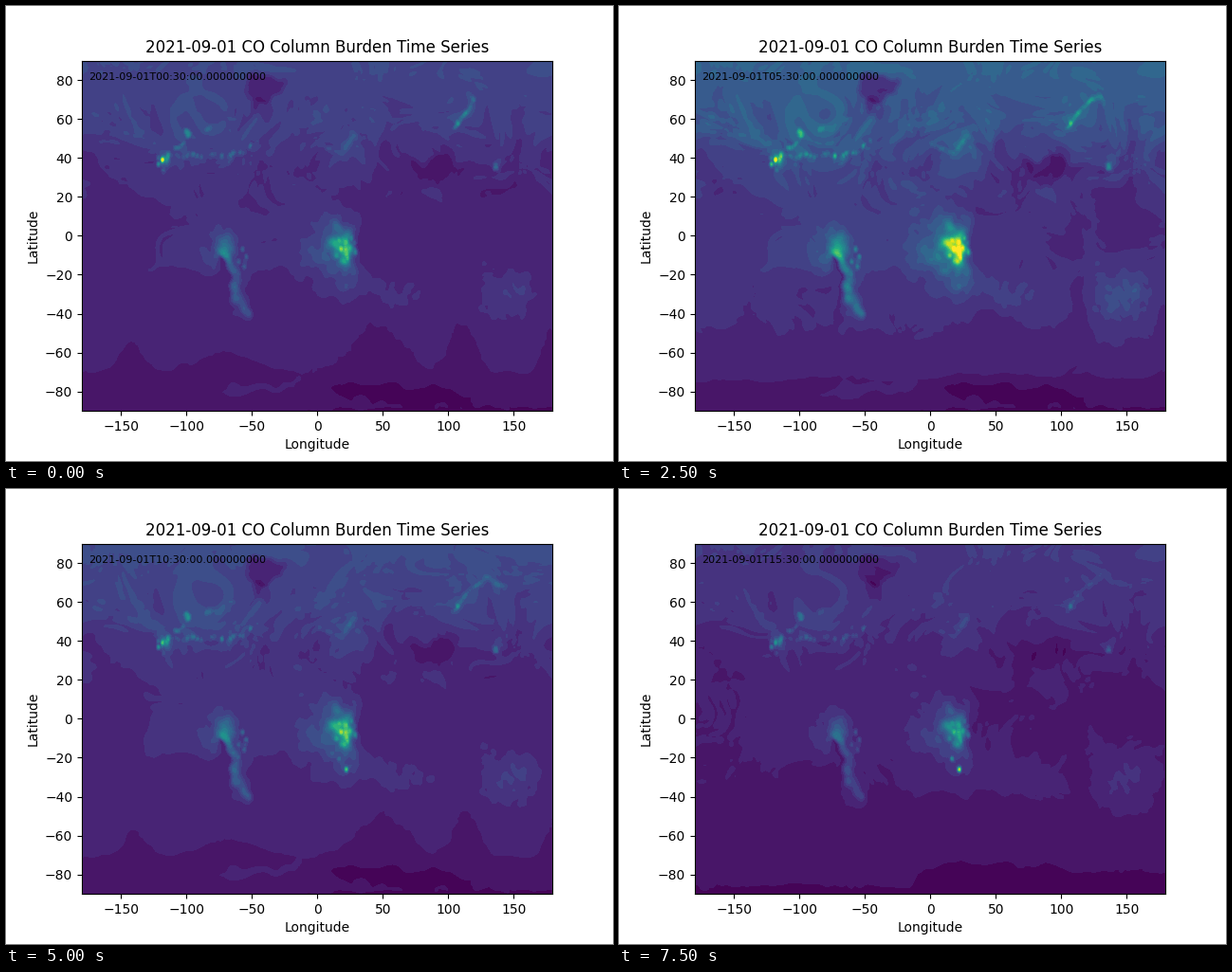
Write a matplotlib script that moves like this. It is 640 by 480 pixels and loops after 8000 ms.

```python
import numpy as np
import matplotlib.pyplot as plt
from matplotlib.animation import FuncAnimation

FRAMES = 16
LAYERS = 22

lon = np.linspace(-180, 179.375, 481)
lat = np.linspace(-90, 90, 241)
X, Y = np.meshgrid(lon, lat)


def waves(x, y, n, lo, hi, seed):
    """Unit-variance noise, periodic in longitude."""
    rng = np.random.default_rng(seed)
    out = np.zeros_like(x)
    for _ in range(n):
        k = rng.uniform(lo, hi)
        a = rng.uniform(-np.pi, np.pi)
        kx, ky = np.round(k * np.cos(a) * 0.8), k * np.sin(a) * 1.2
        phase = np.radians(kx * x + ky * y) + rng.uniform(0, 2 * np.pi)
        out += np.sin(phase) * (lo / k) ** 0.7
    return out / out.std()


# Bent coordinates give every shape an irregular outline.
bend = waves(X, Y, 24, 9, 42, 1)
XB = X + 1.7 * bend
YB = Y + 1.3 * waves(X, Y, 24, 9, 42, 2)
swirl_x = 11 * waves(X, Y, 14, 3, 11, 3)
swirl_y = 6 * waves(X, Y, 14, 3, 11, 4)
grain = waves(X, Y, 30, 25, 80, 7)


def smooth(v):
    v = np.clip(v, 0, 1)
    return v * v * (3 - 2 * v)


def ramp(v):
    return np.clip(v, 0, 1)


def blob(x, y, sx, sy, amp, power=1, tilt=0.0):
    dx, dy = XB - x, YB - y - tilt * (XB - x)
    return amp * np.exp(-(((dx / sx) ** 2 + (dy / sy) ** 2) / 2) ** power)


def plume(x, y, size, amp, wind=(0, 0)):
    """Hot core inside ever wider, weaker halos blown downwind."""
    return sum(blob(x + wind[0] * j, y + wind[1] * j,
                    size * 1.65 ** j, size * 1.5 ** j, amp * 0.48 ** j)
               for j in range(4))


def spot(x, y, amp, size=0.8):
    return amp * np.exp(-((X - x) ** 2 + (Y - y) ** 2) / (2 * size ** 2))


def spots(x, y, spread, n, amp, seed):
    rng = np.random.default_rng(seed)
    return sum(spot(rng.normal(x, spread), rng.normal(y, spread * 0.7),
                    amp * rng.uniform(0.4, 1)) for _ in range(n))


def streak(points, width, amp, n=26):
    """Ridge along a polyline."""
    px, py = np.transpose(points)
    step = np.linspace(0, len(px) - 1, n)
    d2 = np.full_like(X, 1e9)
    for x, y in zip(np.interp(step, range(len(px)), px),
                    np.interp(step, range(len(px)), py)):
        d2 = np.minimum(d2, (XB - x) ** 2 + (YB - y) ** 2)
    return amp * np.exp(-d2 / (2 * width ** 2))


def background():
    """Clean south, mild tropics, loaded north."""
    start = 35 - 5 * np.cos(np.radians(X + 85))
    v = (2.42 + 0.5 * ramp((YB - 8) / (start - 8)) ** 2
         + 1.2 * ramp((YB - start) / 20)
         + 0.75 * ramp((YB - 60) / 24))
    west = smooth((78 - abs(XB + 70)) / 22) * smooth((29 - abs(YB - 6)) / 9)
    return v + 0.5 * west


def southern_drop(k):
    edge = -70 + 0.6 * bend
    for centre, width, rise in [(-142, 13, 17), (-70, 26, 12), (46, 26, 28),
                                (111, 13, 32), (178, 9, 24)]:
        edge = edge + rise * np.exp(-((X - centre - 4 * k) / width) ** 2)
    return (0.45 * ramp(YB / edge) ** 3
            + 0.45 * ramp((edge - Y) / (edge + 76))
            + 0.03 * np.clip(-76 - Y, 0, None))


def smoke():
    coast = smooth((37 - XB) / 9)
    v = plume(21, -5, 5, 7, (-5, 0.5)) * coast + blob(18, -15, 5, 4, 2)
    v += blob(24, -22, 7, 7, 1)
    v += plume(-70, -8, 3.6, 3.8, (-2, 1.5))
    v += streak([(-66, -12), (-63, -24), (-62, -34), (-54, -39)], 2.6, 2.9)
    v += blob(-61, -30, 6, 11, 1)
    v += plume(28, 48, 3.5, 1.2, (-3, 0)) + plume(-117, 40, 2.5, 2, (3, 1))
    v += plume(110, 61, 4, 0.6) + plume(138, 36, 2, 1)
    v += blob(-72, 45, 24, 8, 0.5) + blob(52, -29, 26, 6, 0.9, tilt=-0.1)
    v += blob(128, -14, 5, 9, 0.5, tilt=-0.6)

    thin = streak([(-122, 40), (-114, 41), (-102, 48), (-100, 55)], 0.9, 2.6)
    thin += streak([(-114, 42), (-90, 41), (-68, 40), (-46, 46)], 0.9, 2.2)
    thin += streak([(-82, 54), (-62, 59)], 1.1, 1.0)
    thin += streak([(0, 48), (20, 44), (31, 50)], 1.1, 1.2)
    v += thin * np.clip(0.8 + 0.5 * grain, 0.1, 1.7)

    v *= 1 + 0.11 * grain + 0.08 * bend
    v += spots(22, -6, 4.5, 18, 4, 8) + spots(-57, -14, 4, 6, 3.5, 9)
    v += spots(-117, 39, 4, 9, 4, 10) + spots(136, 35, 1.5, 3, 2.5, 11)
    return v + spot(107, 58, 4.5) + blob(22, -5, 2.4, 2.4, 2)


def clean_air():
    low = blob(-40, 76, 12, 5, 2.3, 3) + blob(-43, 67, 6, 5, 1.4, 3)
    low += blob(89, 34, 14, 4.5, 1.2, 3, -0.08)
    low += blob(140, 2, 42, 20, 0.25)
    low += blob(58, -80, 42, 4, 0.45, 2, -0.05)
    low += 0.2 * smooth((X + 20) / 25) * smooth((-70 - Y) / 6)
    return low - blob(-48, -79, 26, 1.8, 0.7, 2, 0.06)


fixed = background() + smoke() - clean_air()
andes = streak([(-73, -14), (-69, -22), (-71, -48)], 1.4, 1.0)
north = smooth((Y - 6) / 32) * (1 - 0.75 * smooth((Y - 64) / 14))


def noise(i):
    x, y = X + swirl_x - 0.45 * i * north, Y + swirl_y
    big = waves(x, y, 22, 5, 16, 5)
    fine = waves(x, y, 32, 18, 60, 6)
    calm = 0.02 + 0.04 * smooth((Y + 55) / 30)
    return np.clip((calm + 0.24 * north) * big
                   + (0.7 * calm + 0.18 * north) * fine, -0.6, 0.9)


def field(i):
    k = i / (FRAMES - 1)
    v = fixed - southern_drop(k) + noise(i)
    v += blob(146 + 3 * k, -31, 15, 9, 1.5, 1, 0.1) * (1 + 0.15 * grain)

    # Smoke arc drifting east.
    arc = [(107, 58), (115 + 2 * k, 63.5 + 5 * k),
           (116 + 17 * k, 70 + 3 * k), (117 + 36 * k, 71.5 - 5 * k)]
    v += streak(arc, 1.1, 3.2 - 2 * k) * np.clip(1 + 0.3 * grain, 0.3, 1.6)

    v += (1.9 - v) * andes
    v += spot(-118.5, 39, 6 + 11 * np.exp(-i / 4))
    v += spot(-73, 41, 3 + 4 * np.exp(-((i - 7) / 4) ** 2))
    v += spot(22, -26, 1 + 20 * smooth((i - 6) / 8))
    v += spot(16.5, -20.5, 9 * smooth((i - 8) / 5))
    return v


def levels(i):
    """First boundary and spacing of the colour layers."""
    k = i / (FRAMES - 1)
    first = 0.95 + 0.28 * k ** 12
    step = 1 + 0.22 * k ** 6 - 0.42 * np.exp(-((i - 6.3) / 2.9) ** 2)
    return first, step


fig, ax = plt.subplots(figsize=(6.4, 4.8), dpi=100)
ax.set_title("2021-09-01 CO Column Burden Time Series")
ax.set_xlabel("Longitude")
ax.set_ylabel("Latitude")
stamp = ax.text(-175, 80, "", fontsize=8, zorder=5)
shown = []


def update(i):
    while shown:
        shown.pop().remove()
    first, step = levels(i)
    vmin = first - 0.72 * step
    shown.append(ax.contourf(lon, lat, field(i),
                             first + step * np.arange(-1, LAYERS),
                             cmap="viridis", vmin=vmin,
                             vmax=vmin + LAYERS * step, extend="both"))
    ax.set_xlim(lon[0], lon[-1])
    ax.set_ylim(-90, 90)
    stamp.set_text(f"2021-09-01T{i:02d}:30:00.000000000")
    return [stamp]


anim = FuncAnimation(fig, update, frames=FRAMES, interval=500,
                     init_func=lambda: [stamp], repeat=True)
plt.show()
```
